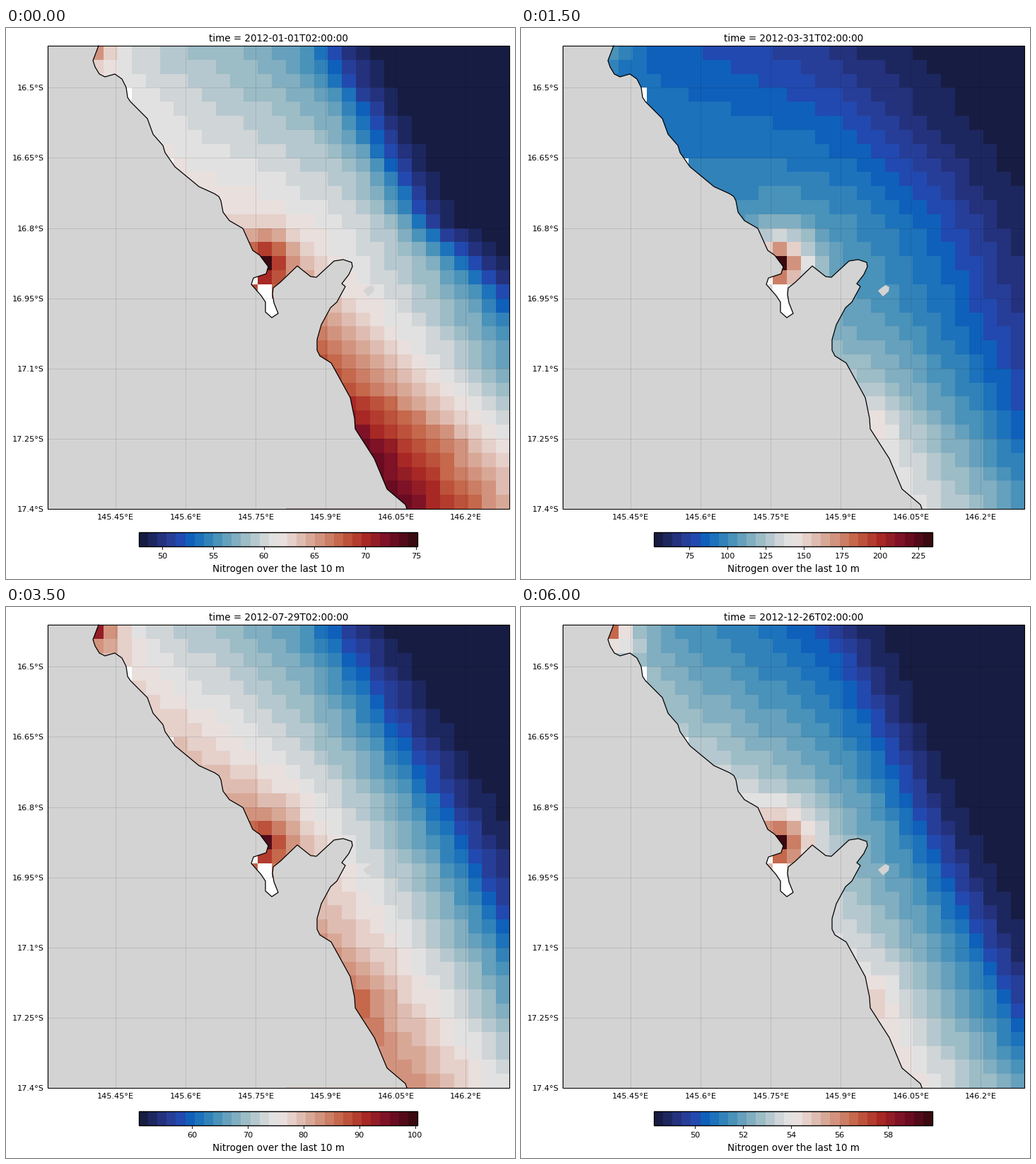
Recreate the animation shown at these times as a matplotlib script. Size 720 by 778 pixels, loop 6.5 s.

```python
import numpy as np
import matplotlib.pyplot as plt
from matplotlib.animation import FuncAnimation
from matplotlib.colors import LinearSegmentedColormap
from matplotlib.patches import Polygon, Rectangle

W, H = 720, 778
CELLS, CELL, STEPS = 33, 19.81, 13
LEFT, TOP = 58.5, 25
RIGHT, BOTTOM = LEFT + CELLS * CELL, TOP + CELLS * CELL
GAP = 5 * CELL
BAR_L, BAR_R, BAR_T, BAR_B = 188, 582, 712, 732
BANDS = 30
LAND = "#d3d3d3"

STOPS = [
    (0, "#171c42"), (.09, "#293a8f"), (.135, "#2448af"), (.18, "#0b66bd"),
    (.27, "#4590b9"), (.36, "#8eb5c2"), (.45, "#d2d6d8"), (.5, "#ebe7e6"),
    (.55, "#e6d2cc"), (.64, "#d59d89"), (.73, "#c46548"), (.82, "#ac2b24"),
    (.91, "#780e28"), (1, "#3c0911"),
]
balance = LinearSegmentedColormap.from_list("balance", STOPS, N=BANDS)
balance.set_bad("white")

# Coastline in pixels: northern shore, bay, cape, southern shore
COAST = [
    (131, 25), (123, 46), (126, 55), (132, 65), (140, 69), (154, 65),
    (164, 72), (170, 84), (172, 98), (176, 104), (200, 128), (208, 150),
    (222, 166), (225, 176), (239, 196), (273, 224), (295, 234), (301, 238),
    (304, 244), (307, 260), (316, 272), (335, 283), (349, 314), (359, 321),
    (371, 337), (368, 347), (350, 353), (347, 362), (361, 378), (367, 387),
    (367, 401), (376, 409), (385, 403), (379, 388), (377, 376), (378, 367),
    (388, 359), (412, 336), (431, 351), (439, 352), (464, 329), (477, 327),
    (489, 331), (490, 337), (485, 348), (475, 361), (480, 365), (468, 387),
    (459, 395), (446, 419), (440, 440), (440, 455), (444, 463), (460, 473),
    (487, 522), (493, 551), (494, 566), (521, 608), (539, 651), (565, 673),
    (567, BOTTOM),
]
ISLAND = [(505, 371), (511, 366), (516, 363), (521, 366), (520, 372), (512, 379)]

# Shore sections (grid rows) and river mouths (row, column, reach in cells)
SECTIONS = (0, 12, 28)
RIVERS = ((15, 15, 1.4), (26, 22, 1.6), (0, 3, 1.3))

# Seasons: step -> colour range; (shore level, shelf-edge level, shelf width)
# for each section; softness of the front; strength of each river plume
SEASONS = {
    0: ((47.67, 75.15), (46, 30, 16.5), (53, 43, 14.3), (90, 0, 22), 1.2, (45, 0, 18)),
    1: ((48.3, 123.3), (17, 9, 18.5), (13, 9, 21), (14, 8, 20), 1.5, (88, 18, 16)),
    3: ((51.6, 234.4), (19, 12, 18), (26, 30, 15.5), (48, 20, 13), 3, (74, 8, 10)),
    6: ((49.45, 120.9), (78, 48, 15.3), (86, 50, 11.5), (95, 56, 8), 1.4, (14, 6, 0)),
    8: ((51.58, 79.93), (20, 11, 19), (38, 9, 21), (36, 0, 20), 1.8, (55, 14, 70)),
    10: ((50.84, 62), (32, 18, 18.5), (46, 8, 20), (80, 0, 25), 1.5, (50, 10, 50)),
    12: ((48.3, 59.85), (33, 16, 17), (46, 24, 13.5), (50, 20, 11), 1.3, (55, 9, 38)),
}
TABLE = np.array([np.hstack(season) for season in SEASONS.values()])

rows, cols = np.indices((CELLS, CELLS))
offshore = cols - (3.5 + .68 * rows)

# Cells without data: the inner bay and two coves
dry = (rows >= 17) & (cols <= 16) & (rows + cols > 31)
dry[17, 16] = False
dry[3, 5] = dry[8, 8] = dry[16, 14] = True


def along_shore(values):
    return np.interp(rows, SECTIONS, values)


def state(step):
    """Concentration on the grid (0 to 1 of the colour range) and that range."""
    p = np.array([np.interp(step, list(SEASONS), column) for column in TABLE.T])
    low, high = p[:2]
    shore, edge, front = (along_shore(p[2 + i:11:3]) for i in range(3))
    softness, plumes = p[11], p[12:]
    shelf = shore + (edge - shore) * np.clip(offshore / front, 0, 1)
    field = shelf / (1 + np.exp((offshore - front) / softness))
    for (row, col, reach), strength in zip(RIVERS, plumes):
        field += strength * np.exp(-np.hypot(rows - row, cols - col) / reach)
    return np.ma.masked_array(np.clip(field / 100, 0, 1), dry), low, high


def ticks(low, high):
    gap = next(g for g in (1, 2, 5, 10, 20, 25, 50) if (high - low) / g <= 8)
    return np.arange(np.ceil(low / gap) * gap, high + 1e-6, gap)


plt.rcParams["font.family"] = "DejaVu Sans"
fig = plt.figure(figsize=(W / 72, H / 72), dpi=72, facecolor="white")
ax = fig.add_axes([0, 0, 1, 1])
ax.axis("off")


def label(x, y, text="", size=11.25, ha="center"):
    return ax.text(x, y, text, size=size, ha=ha, va="baseline")


def box(x0, y0, x1, y1, lw):
    ax.add_patch(Rectangle((x0, y0), x1 - x0, y1 - y0, fill=False, ec="black",
                           lw=lw, zorder=6))


def raster(data, *extent):
    return ax.imshow(data, cmap=balance, vmin=0, vmax=1, extent=extent,
                     interpolation="nearest", aspect="auto")


sea = raster(np.zeros((CELLS, CELLS)), LEFT, RIGHT, BOTTOM, TOP)
raster(np.linspace(0, 1, BANDS)[None], BAR_L, BAR_R, BAR_B, BAR_T)
ax.set(xlim=(0, W), ylim=(H, 0))

ax.add_patch(Polygon(COAST + [(LEFT, BOTTOM), (LEFT, TOP)], fc=LAND, lw=0, zorder=2))
ax.add_patch(Polygon(ISLAND, fc=LAND, lw=0, zorder=2))
ax.plot(*zip(*COAST), color="black", lw=1.25, zorder=4)

grid_style = dict(color="black", alpha=.12, lw=.9, zorder=3)
for i in range(6):
    x = 155.2 + GAP * i
    ax.plot([x, x], [TOP, BOTTOM], **grid_style)
    label(x, 694.5, f"{145.45 + .15 * i:.2f}".rstrip("0") + "°E")
for i in range(7):
    y = BOTTOM - GAP * (6 - i)
    ax.plot([LEFT, RIGHT], [y, y], **grid_style)
    label(53.5, y + 4, f"{16.5 + .15 * i:.2f}".rstrip("0") + "°S", ha="right")

box(LEFT, TOP, RIGHT, BOTTOM, 1.1)
box(BAR_L, BAR_T, BAR_R, BAR_B, 1.4)
label(385.2, 768, "Nitrogen over the last 10 m", 13.5)
title = label(385.2, 18.5, size=13.5)
marks = [(ax.plot([], [], color="black", lw=.9)[0], label(0, 749)) for _ in range(10)]
start = np.datetime64("2012-01-01T02:00:00")


def update(step):
    field, low, high = state(step)
    sea.set_data(field)
    title.set_text(f"time = {start + np.timedelta64(30 * step, 'D')}")
    values = ticks(low, high)
    for i, (line, text) in enumerate(marks):
        shown = i < len(values)
        line.set_visible(shown)
        text.set_visible(shown)
        if shown:
            x = BAR_L + (values[i] - low) / (high - low) * (BAR_R - BAR_L)
            line.set_data([x, x], [BAR_B, BAR_B + 4])
            text.set_x(x)
            text.set_text(f"{values[i]:.0f}")


anim = FuncAnimation(fig, update, frames=STEPS, interval=500, repeat=True)
plt.show()
```
